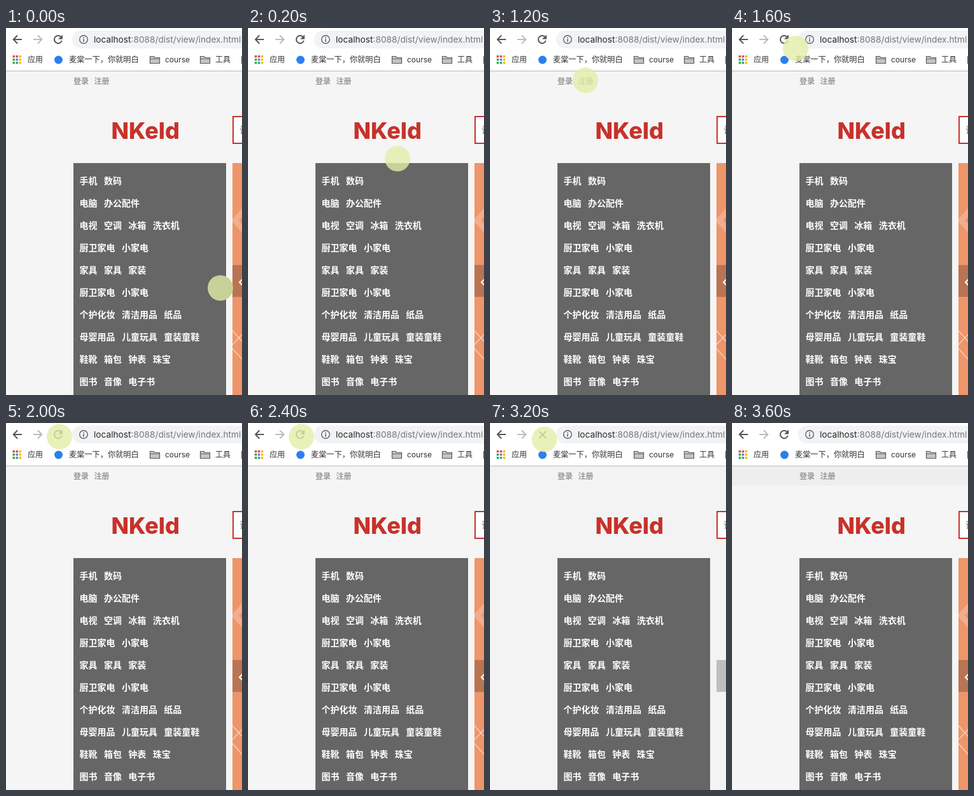
An HTML page with a canvas for the animation above (5.4 s loop, 371 by 576 pixels).

```html
<!DOCTYPE html>
<html lang="zh-CN">
<head>
<meta charset="utf-8">
<title>NKeld</title>
<style>
html, body { margin: 0; width: 100%; height: 100%; overflow: hidden; background: #fff; }
canvas { display: block; width: 371px; height: 576px; }
</style>
</head>
<body>
<canvas id="stage" width="371" height="576"></canvas>
<script>
const ctx = document.getElementById('stage').getContext('2d');
const LOOP = 5400, STEP = 200;
const BRAND = 'NKeld';
const SANS = 'Inter, "Noto Sans CJK SC", "Noto Sans CJK", sans-serif';
const RED = '#c7322b', BLUE = '#1038e6', PURPLE = '#45197a', ICON = '#55585b';
const HALO = 'rgba(228,237,168,.79)', HALO_START = '#c8d198';

// Pointer halo position per step; it rests at REST until the reload ends.
const REST = [84, 21.5];
const PATH = [[337, 408], [235, 205], [180, 114], [176, 107], [262, 65], [176, 106],
  [150, 82], [120, 56], [100, 32], [86, 22.5]];

// A star marks a visited link.
const MENU = ['手机 数码*', '电脑 办公配件*', '电视 空调 冰箱 洗衣机', '厨卫家电 小家电*',
  '家具* 家具* 家装', '厨卫家电 小家电*', '个护化妆 清洁用品 纸品*',
  '母婴用品 儿童玩具 童装童鞋*', '鞋靴 箱包 钟表 珠宝', '图书 音像 电子书'];

function rect(x, y, w, h, color) {
  ctx.fillStyle = color;
  ctx.fillRect(x, y, w, h);
}

function disc(x, y, r, color) {
  ctx.fillStyle = color;
  ctx.beginPath();
  ctx.arc(x, y, r, 0, Math.PI * 2);
  ctx.fill();
}

function line(points, color, width) {
  ctx.strokeStyle = color;
  ctx.lineWidth = width;
  ctx.beginPath();
  points.forEach(([x, y]) => ctx.lineTo(x, y));
  ctx.stroke();
}

// Draws text centred on cy and returns its right edge.
function text(str, x, cy, size, color, weight = 400) {
  ctx.font = `${weight} ${size}px ${SANS}`;
  ctx.fillStyle = color;
  ctx.fillText(str, x, Math.round(cy + size * 0.38));
  return x + ctx.measureText(str).width;
}

function link(str, x, cy, visited) {
  const color = visited ? PURPLE : BLUE;
  const end = text(str, x, cy, 16, color);
  rect(x, cy + 7, end - x, 1, color);
  return end;
}

function arrow(x, dir, color) {
  line([[x - 7 * dir, 18], [x + 6 * dir, 18]], color, 2);
  line([[x, 11.5], [x + 6.3 * dir, 18], [x, 24.5]], color, 2);
}

function reloadIcon() {
  ctx.strokeStyle = ICON;
  ctx.lineWidth = 2;
  ctx.beginPath();
  ctx.arc(82, 18, 6, 0.3, Math.PI * 1.75);
  ctx.stroke();
  ctx.fillStyle = ICON;
  ctx.beginPath();
  ctx.moveTo(89, 10.5);
  ctx.lineTo(89, 17.5);
  ctx.lineTo(82, 17.5);
  ctx.fill();
}

function stopIcon() {
  line([[77, 13], [88, 24]], ICON, 2);
  line([[88, 13], [77, 24]], ICON, 2);
}

function folder(x) {
  ctx.beginPath();
  ctx.moveTo(x + 0.5, 55.5);
  [[0.5, 44.5], [6, 44.5], [8, 46.5], [15.5, 46.5], [15.5, 55.5]]
    .forEach(([dx, y]) => ctx.lineTo(x + dx, y));
  ctx.closePath();
  ctx.fillStyle = '#c4c4c4';
  ctx.fill();
  ctx.strokeStyle = '#5c5c5c';
  ctx.lineWidth = 1.2;
  ctx.stroke();
  line([[x + 1, 48.5], [x + 15, 48.5]], '#5c5c5c', 0.8);
}

function toolbar(loading) {
  rect(0, 0, 371, 67, '#fff');
  rect(0, 67, 371, 1, '#b9b9b9');
  arrow(18, -1, ICON);
  arrow(50, 1, '#babcbe');
  loading ? stopIcon() : reloadIcon();

  ctx.fillStyle = '#f1f3f4';
  ctx.beginPath();
  ctx.roundRect(104, 4, 300, 28, 14);
  ctx.fill();
  ctx.strokeStyle = '#5f6368';
  ctx.lineWidth = 1.4;
  ctx.beginPath();
  ctx.arc(122, 18, 6.3, 0, Math.PI * 2);
  ctx.stroke();
  rect(121.2, 14.5, 1.6, 1.6, '#5f6368');
  rect(121.2, 17.2, 1.6, 4.4, '#5f6368');
  const end = text('localhost', 138, 17.5, 13.7, '#25282b');
  text(':8088/dist/view/index.html', end, 17.5, 13.7, '#74787c');

  const dots = ['#e8453c', '#e8453c', '#f5b70f', '#34a853', '#4285f4', '#f5b70f', '#34a853', '#34a853', '#f5b70f'];
  dots.forEach((c, i) => rect(10.5 + i % 3 * 5, 43 + Math.floor(i / 3) * 5, 3.4, 3.4, c));
  text('应用', 34, 49.5, 12, '#333');
  disc(82.5, 50, 6.5, '#2b80ee');
  text('麦棠一下，你就明白', 99, 49.5, 12.2, '#333');
  folder(226);
  text('course', 250, 49.5, 12, '#333');
  folder(305);
  text('工具', 329, 49.5, 12, '#333');
  rect(370, 44, 1, 12, '#5c5c5c');
}

function banner() {
  rect(356, 212, 15, 364, '#ee9569');
  line([[378, 282], [360, 302], [378, 322]], 'rgba(255,255,255,.23)', 9);
  const thin = 'rgba(255,255,255,.55)';
  line([[356, 475], [372, 493]], thin, 1.4);
  line([[372, 480], [356, 497]], thin, 1.4);
  line([[356, 503], [372, 521]], thin, 1.4);
}

function styledPage(hasBanner, hasBar) {
  rect(0, 68, 371, 508, hasBanner ? '#f5f5f5' : '#f3f3f3');
  if (hasBar) rect(0, 68, 371, 30, '#eee');
  text('登录', 106, 83.5, 12, '#999', 700);
  text('注册', 138.5, 83.5, 12, '#999', 700);
  text(BRAND, 165.5, 160, 36, RED, 800);

  rect(356, 138, 15, 44, RED);
  rect(358, 140, 13, 40, '#fff');
  text('请输入商品名称', 367, 160, 14, '#757575');

  rect(106, 212, 240, 364, '#666');
  MENU.forEach((row, i) => {
    let x = 115.5;
    for (const word of row.replaceAll('*', '').split(' '))
      x = text(word, x, 240 + i * 35, 14, '#fff', 700) + 10.4;
  });

  if (hasBanner) banner();
  rect(356, 372, 15, 50, 'rgba(0,0,0,.22)');
  if (hasBanner) line([[373, 393], [367, 399], [373, 405]], '#fff', 2);
}

function bullet(cy) {
  disc(31, cy + 1, 3, '#000');
}

function plainPage() {
  rect(0, 68, 371, 508, '#fff');
  text('登录', 4, 87, 16, '#000');
  text('注册', 41.3, 87, 16, '#000');
  text('欢迎，', 78.6, 87, 16, '#000');
  text('退出', 132, 87, 16, '#000');

  ['购物车(0)', '我的订单', '我的' + BRAND, '关于' + BRAND].forEach((str, i) => {
    const cy = 125 + i * 22;
    bullet(cy);
    link(str, 44, cy, i === 0);
  });
  link(BRAND, 4, 229, true);

  ctx.lineWidth = 1;
  ctx.strokeStyle = '#b4b4b4';
  ctx.strokeRect(4.5, 242.5, 131, 20);
  text('请输入商品名称', 7, 252.5, 12, '#666');
  const face = ctx.createLinearGradient(0, 242, 0, 264);
  face.addColorStop(0, '#f6f6f6');
  face.addColorStop(1, '#dedede');
  rect(141, 242, 40, 22, face);
  ctx.strokeStyle = '#adadad';
  ctx.strokeRect(141.5, 242.5, 39, 21);
  text('搜索', 149, 252.5, 12, '#000');

  MENU.forEach((row, i) => {
    const cy = 291 + i * 22;
    let x = 44;
    bullet(cy);
    for (const word of row.split(' '))
      x = link(word.replace('*', ''), x, cy, word.endsWith('*')) + 5.3;
  });
  text('F1', 4, 543, 32, '#000', 700);
  text('家用电器', 46.5, 543, 32, '#000', 700);
}

function draw(t) {
  const step = Math.floor(t / STEP);
  const bare = t >= 2600 && t < 3200;
  const loading = t >= 3200 && t < 3400;
  if (bare) plainPage();
  else styledPage(!loading, t >= 3600);
  toolbar(loading);
  if (t < 3400) {
    const [x, y] = loading ? [85.5, 25.5] : PATH[step] || REST;
    disc(x, y, 20, step ? HALO : HALO_START);
  }
}

function tick(now) {
  draw(now % LOOP);
  requestAnimationFrame(tick);
}
draw(0);
requestAnimationFrame(tick);
</script>
</body>
</html>
```
